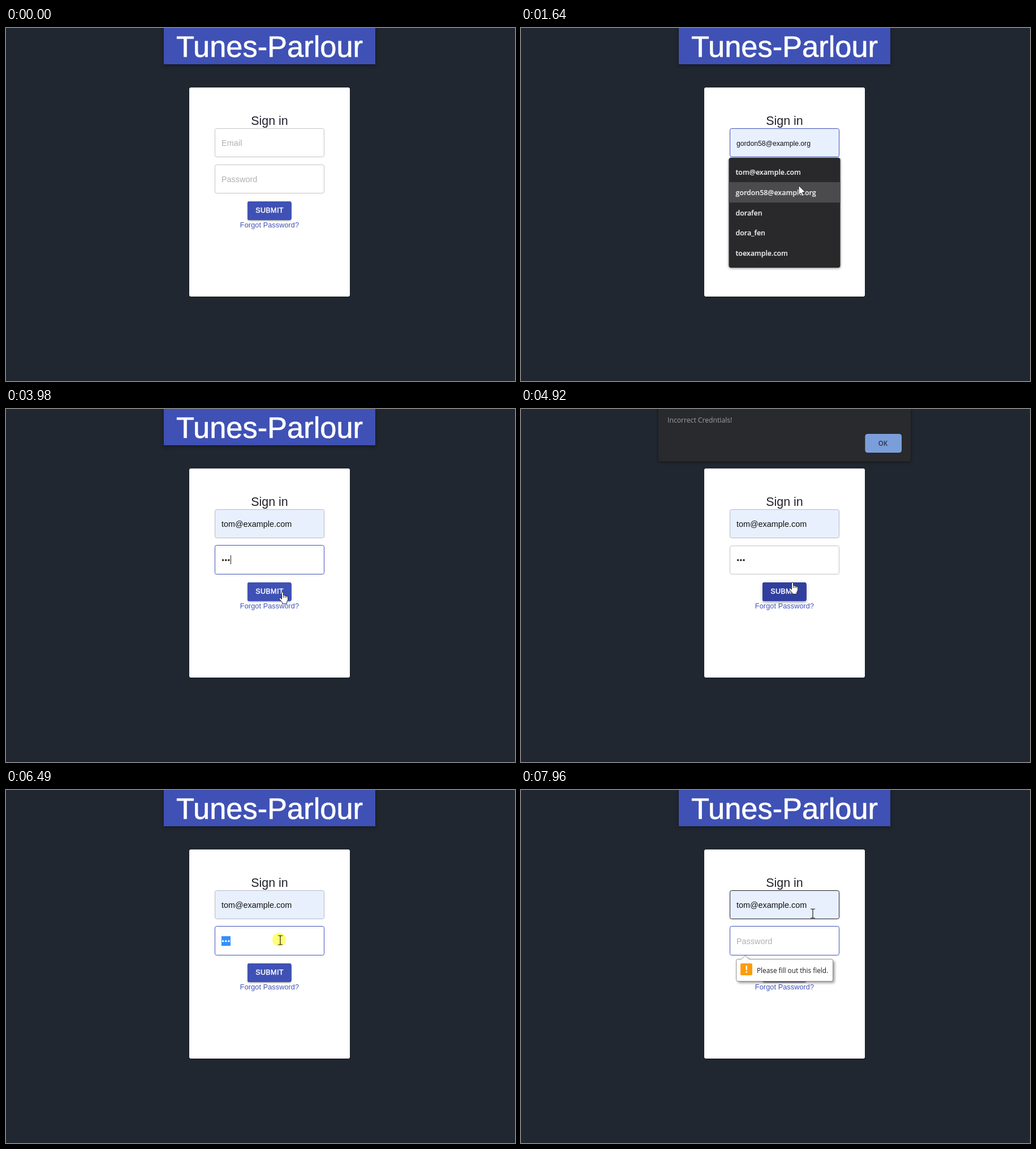
Animation, 900 px wide and 623 px high, one loop 8 s. Source, as an HTML page with a canvas:

```html
<!DOCTYPE html>
<html lang="en">
<head>
<meta charset="utf-8">
<title>Sign in</title>
<style>
  html, body { margin: 0; width: 100%; height: 100%; overflow: hidden; background: #212730; }
  canvas { display: block; }
</style>
</head>
<body>
<canvas id="stage" width="900" height="623"></canvas>
<script>
const ctx = document.getElementById('stage').getContext('2d');
const LOOP = 8000;
const SANS = '"Liberation Sans", Arial, sans-serif';
const UI = '"Open Sans", "Noto Sans", sans-serif';
const BLUE = '#3f51b5';
const HINT = '#b0b0b0';
const LOGIN = 'tom@example.com';
const CHOICES = [LOGIN, 'gordon58@example.org', 'dorafen', 'dora_fen', 'toexample.com'];

// Layered shadows: y offset, blur, spread, opacity.
const LOW = [[2, 1, -1, .2], [1, 1, 0, .14], [1, 3, 0, .12]];
const MID = [[3, 1, -2, .2], [2, 2, 0, .14], [1, 5, 0, .12]];
const HIGH = [[2, 4, -1, .2], [4, 5, 0, .14], [1, 10, 0, .12]];

// The screen refreshes in bursts: start, end, number of refreshes.
const BURSTS = [
  [0, 0, 1], [210, 850, 9], [1320, 2100, 11], [2180, 2330, 3], [2500, 2500, 1],
  [2880, 2880, 1], [3430, 3660, 4], [3980, 4750, 11], [4840, 5620, 11],
  [5690, 6320, 9], [6490, 6550, 2], [6720, 7510, 11], [7580, 7960, 6]
];

// Pointer path: time, x, y, shape from that time on.
const PATH = [
  [210, 450, 490, 'arrow'], [450, 474, 330, 'arrow'], [610, 489, 212, 'beam'],
  [690, 490, 205, 'beam'], [1320, 490, 205, 'beam'], [1390, 491, 240, 'arrow'],
  [1630, 491, 278, 'arrow'], [1710, 491, 280, 'arrow'], [1860, 492, 257, 'arrow'],
  [2100, 492, 257, 'beam'], [2250, 497, 268, 'beam'], [3940, 497, 268, 'beam'],
  [3980, 482, 322, 'hand'], [4130, 482, 329, 'hand'], [4280, 473, 305, 'hand'],
  [4950, 473, 305, 'hand'], [5060, 500, 270, 'arrow'], [5380, 638, 64, 'arrow'],
  [5700, 640, 62, 'arrow'], [5920, 580, 160, 'arrow'], [6150, 487, 258, 'beam'],
  [6240, 485, 265, 'beam'], [6790, 485, 265, 'beam'], [6950, 477, 300, 'arrow'],
  [7030, 473, 309, 'hand'], [7510, 473, 309, 'hand'], [7580, 490, 300, 'arrow'],
  [7720, 505, 255, 'beam'], [7955, 516, 218, 'beam']
];

const CLICKS = [[690, 840], [1940, 2090], [2250, 2490], [4280, 4500], [5460, 5680],
  [6490, 6545], [7180, 7400]];
const CARET = [[2250, 2880], [3430, 4280], [6240, 6490], [6720, 7180]];

const SHAPES = {
  arrow: new Path2D('M0 0V16.5L3.8 13L6.5 19L9.2 17.8L6.6 12H11.8Z'),
  hand: new Path2D('M5.5 1.7Q7 .1 8.5 1.7V7Q10.3 6 11.5 7.5Q13 6.6 14.2 8Q16 7.6 16.5 9.5V15L14.6 18.5V21.7H6.5V19.5L1 12.8Q.9 10.6 3 11.2L5.5 13.5Z'),
  beam: new Path2D('M-4 -8H-1L0 -7L1 -8H4M0 -7V7M-4 8H-1L0 7L1 8H4')
};

const clamp = v => Math.max(0, Math.min(1, v));
const ease = v => v * v * (3 - 2 * v);
const ramp = (t, a, b) => ease(clamp((t - a) / (b - a)));
const during = (t, a, b) => t >= a && t < b;
const within = (t, spans) => spans.some(([a, b]) => during(t, a, b));

function snap(t) {
  let last = 0;
  for (const [start, end, count] of BURSTS) {
    if (t < start) break;
    const step = count > 1 ? (end - start) / (count - 1) : 1;
    last = start + step * Math.min(count - 1, Math.floor((t - start) / step + 1e-6));
  }
  return last;
}

function box(x, y, w, h, r, fill, line) {
  ctx.beginPath();
  ctx.roundRect(x, y, w, h, r);
  if (fill) { ctx.fillStyle = fill; ctx.fill(); }
  if (line) { ctx.strokeStyle = line; ctx.lineWidth = 1; ctx.stroke(); }
}

function shadow(color, blur, y, x = 0) {
  ctx.shadowColor = color;
  ctx.shadowBlur = blur;
  ctx.shadowOffsetX = x;
  ctx.shadowOffsetY = y;
}

const noShadow = () => shadow('transparent', 0, 0);

function raised(x, y, w, h, r, fill, layers) {
  for (const [dy, blur, grow, alpha] of layers) {
    shadow(`rgba(0,0,0,${alpha})`, blur * .9, dy * .9);
    box(x - grow, y - grow, w + 2 * grow, h + 2 * grow, r, fill);
  }
  noShadow();
  box(x, y, w, h, r, fill);
}

function text(str, x, y, font, color, align = 'left', spacing = 0, weight = 0) {
  ctx.font = font;
  ctx.fillStyle = ctx.strokeStyle = color;
  ctx.textAlign = align;
  ctx.letterSpacing = spacing + 'px';
  ctx.fillText(str, x, y);
  if (weight) {
    ctx.lineWidth = weight;
    ctx.lineJoin = 'round';
    ctx.strokeText(str, x, y);
  }
}

function page() {
  ctx.fillStyle = '#212730';
  ctx.fillRect(0, 0, 900, 623);
  raised(279, -6, 374, 70, 0, BLUE, HIGH);
  text('Tunes-Parlour', 466, 51, '52.4px ' + SANS, '#fff', 'center', 0, .7);
  raised(324, 105, 284, 369, 4, '#fff', LOW);
  text('Sign in', 466, 171, '21.4px ' + SANS, '#20202c', 'center');
}

function emailField(t, pick) {
  const focus = during(t, 690, 2250);
  const filled = t >= 2090;
  const preview = pick >= 0;
  const line = focus ? BLUE : t > 7840 ? '#1c1e22' : filled ? '#b4bac4' : '#c4c4c4';
  box(369.5, 177.5, 193, 50, 3, filled || preview ? '#e8f0fe' : '#fff', line);
  if (filled) text(LOGIN, 381, 207.5, '14.4px ' + SANS, '#111');
  else if (preview) text(CHOICES[pick], 381, 207.5, '12.2px ' + SANS, '#111');
  else text('Email', 381, 207.5, '14.4px ' + SANS, HINT, 'left', .13);
}

function dots(count, color) {
  ctx.fillStyle = color;
  for (let i = 0; i < count; i++) {
    ctx.beginPath();
    ctx.arc(383.6 + 5.2 * i, 266.8, 1.8, 0, 7);
    ctx.fill();
  }
}

function passwordField(t) {
  const focus = during(t, 2250, 4280) || during(t, 6240, 7180) || t >= 7400;
  const top = focus ? 240.5 : 241.5;
  box(369.5, top, 193, 291.5 - top, 3, '#fff', focus ? BLUE : '#c4c4c4');
  const typed = t >= 6720 ? 0 : [3500, 3580, 3655].filter(at => t >= at).length;
  if (during(t, 6490, 6720)) {
    ctx.fillStyle = '#3390ff';
    ctx.fillRect(381, 258, 16, 17);
    dots(typed, '#fff');
  } else if (typed) dots(typed, '#222');
  else text('Password', 381, 271.5, '14.4px ' + SANS, HINT);
  if (within(t, CARET)) {
    ctx.fillStyle = '#222';
    ctx.fillRect(typed ? 397 : 381, 258, 1, 16);
  }
}

function submitButton(t) {
  const hover = ramp(t, 3980, 4230) * (1 - ramp(t, 5690, 5940))
    + ramp(t, 7020, 7260) * (1 - ramp(t, 7430, 7660));
  const mix = (a, b) => Math.round(a + (b - a) * hover);
  const fill = `rgb(${mix(63, 48)},${mix(81, 63)},${mix(181, 159)})`;
  raised(427, 306, 77.5, 33, 3.6, fill, hover > .5 ? HIGH : MID);
  const press = [4280, 7180].find(at => during(t, at, at + 450));
  if (press) {
    const p = (t - press) / 450;
    ctx.save();
    ctx.beginPath();
    ctx.roundRect(427, 306, 77.5, 33, 3.6);
    ctx.clip();
    ctx.beginPath();
    ctx.arc(480, 312, 10 + 60 * p, 0, 7);
    ctx.fillStyle = `rgba(255,255,255,${.22 * (1 - p)})`;
    ctx.fill();
    ctx.restore();
  }
  text('SUBMIT', 466, 326, '12.6px ' + SANS, '#fff', 'center', .36, .45);
  text('Forgot Password?', 466, 352, '12.6px ' + SANS, BLUE, 'center', .13);
}

function menu(pick) {
  shadow('rgba(0,0,0,.5)', 4, 1);
  box(367.5, 229, 197, 194, 4, '#29292c');
  noShadow();
  if (pick >= 0) {
    ctx.fillStyle = '#4b4b4d';
    ctx.fillRect(367.5, 236 + 36 * pick, 197, 36);
  }
  CHOICES.forEach((name, i) =>
    text(name, 379.5, 259 + 35.8 * i, '600 12.4px ' + UI, '#e9e9eb', 'left', 0, .2));
}

function alertBox(t) {
  const grow = t < 4800 ? 0 : t < 4900 ? .75 : 1;
  const scale = .67 + .33 * (grow ? .96 + .04 * grow : 0);
  ctx.save();
  ctx.globalAlpha = t >= 5690 ? .35 : grow || .12;
  ctx.translate(466, 40);
  ctx.scale(scale, scale);
  ctx.translate(-466, -40);
  shadow('rgba(0,0,0,.5)', 5, 1);
  box(243, -40, 446, 132.5, 4, '#292a2d');
  noShadow();
  text('Incorrect Credntials!', 259, 23.5, '12.2px ' + UI, '#9aa0a6');
  box(609, 44.5, 63.5, 32, 3.5, '#7a9eda', '#87a9e2');
  text('OK', 640, 64.5, '600 11.6px ' + UI, '#2b3445', 'center');
  ctx.restore();
}

function hint(t) {
  ctx.save();
  ctx.globalAlpha = t < 7500 ? .6 : 1;
  ctx.beginPath();
  ctx.moveTo(390, 298.5);
  ctx.lineTo(396.5, 292);
  ctx.lineTo(403, 298.5);
  ctx.lineTo(549, 298.5);
  ctx.arcTo(551.5, 298.5, 551.5, 302, 3);
  ctx.arcTo(551.5, 337.5, 548, 337.5, 3);
  ctx.arcTo(380.5, 337.5, 380.5, 334, 3);
  ctx.arcTo(380.5, 298.5, 384, 298.5, 3);
  ctx.closePath();
  shadow('rgba(0,0,0,.4)', 4, 3, 3);
  ctx.fillStyle = '#fff';
  ctx.fill();
  noShadow();
  ctx.strokeStyle = '#8c8c8c';
  ctx.lineWidth = 1;
  ctx.stroke();
  box(388, 306, 21, 21, 2, '#fb9d0c');
  ctx.fillStyle = '#fff';
  ctx.fillRect(397.5, 310, 2.4, 8);
  ctx.fillRect(397.5, 320, 2.4, 2.4);
  text('Please fill out this field.', 417, 322.5, '11.8px ' + UI, '#1a1a1a');
  ctx.restore();
}

function pointer(t) {
  if (t < PATH[0][0]) return;
  let i = 0;
  while (i < PATH.length - 1 && PATH[i + 1][0] <= t) i++;
  const [t0, x0, y0, shape] = PATH[i];
  const [t1, x1, y1] = PATH[i + 1] || [t0 + 1, x0, y0];
  const k = ramp(t, t0, t1);
  ctx.save();
  ctx.translate(x0 + (x1 - x0) * k, y0 + (y1 - y0) * k);
  if (within(t, CLICKS)) {
    const [dx, dy] = shape === 'hand' ? [5, 1] : [-2, -1];
    ctx.beginPath();
    ctx.arc(dx, dy, 12, 0, 7);
    ctx.fillStyle = 'rgba(255,255,80,.8)';
    ctx.fill();
  }
  ctx.lineWidth = shape === 'beam' ? 1.2 : 1;
  ctx.strokeStyle = '#222';
  ctx.lineJoin = 'round';
  if (shape !== 'beam') {
    ctx.fillStyle = '#fff';
    ctx.fill(SHAPES[shape]);
  }
  ctx.stroke(SHAPES[shape]);
  if (shape === 'hand') {
    ctx.beginPath();
    for (const x of [8.5, 11.5, 14.2]) {
      ctx.moveTo(x, 7.5);
      ctx.lineTo(x, 11);
    }
    ctx.stroke();
  }
  ctx.restore();
}

function draw(t) {
  const pick = during(t, 1540, 1780) ? 1 : during(t, 1380, 1540) || during(t, 1780, 2090) ? 0 : -1;
  page();
  emailField(t, pick);
  passwordField(t);
  submitButton(t);
  if (during(t, 765, 2090)) menu(pick);
  if (during(t, 4740, 5760)) alertBox(t);
  if (t >= 7400) hint(t);
  pointer(t);
}

const begin = performance.now();
function tick() {
  draw(snap((performance.now() - begin) % LOOP));
  requestAnimationFrame(tick);
}
tick();
</script>
</body>
</html>
```
